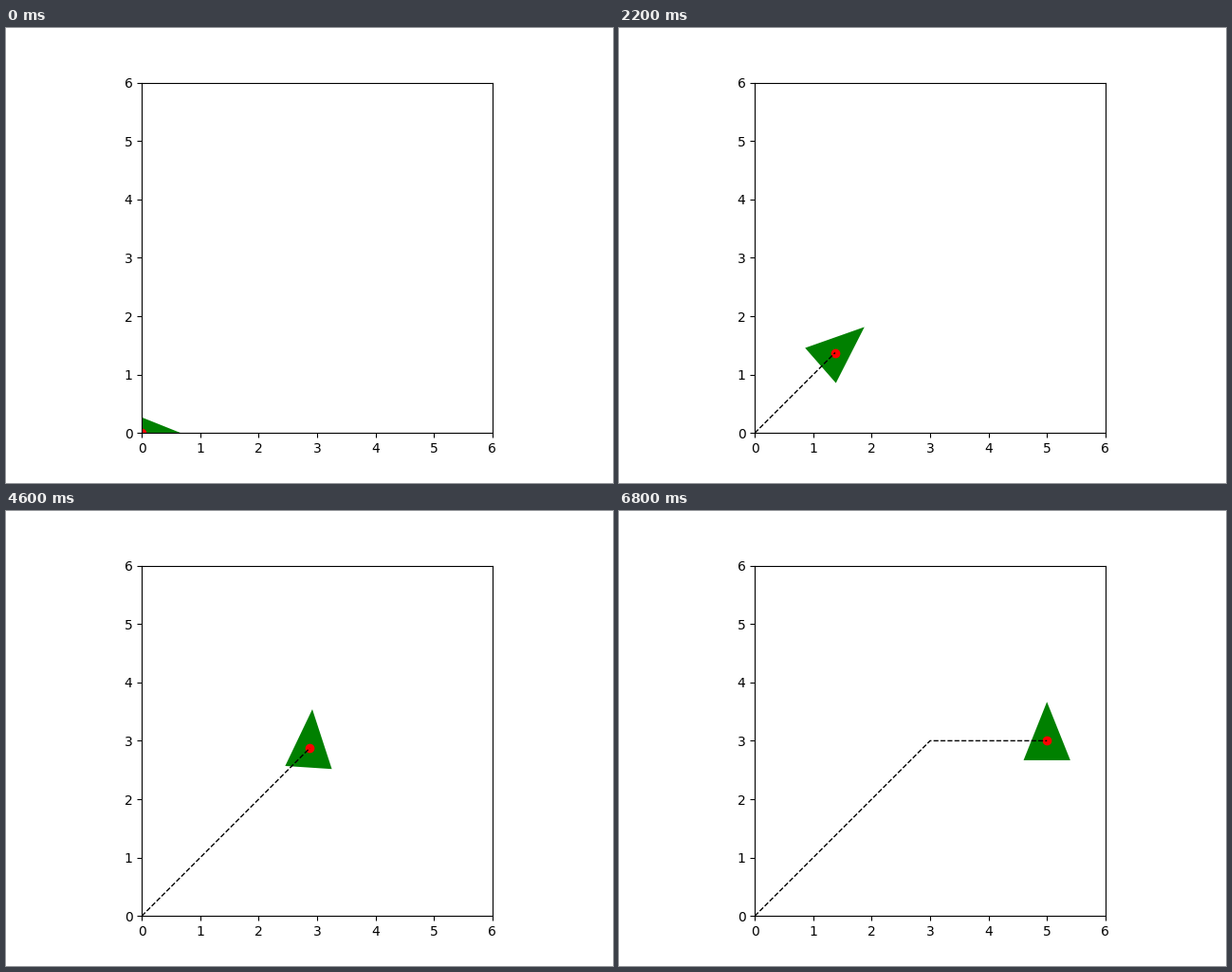
These frames come from a looping animation (640 px wide and 480 px high, 7 s). A matplotlib script:

```python
import numpy as np
import matplotlib.pyplot as plt
from matplotlib.animation import FuncAnimation
from matplotlib.patches import Polygon

TURN_STEPS, SLIDE_STEPS = 25, 10

# Diagonal run with a quarter turn, then a straight slide to the right.
xs = np.concatenate([np.linspace(0, 3, TURN_STEPS), np.linspace(3, 5, SLIDE_STEPS)])
ys = np.concatenate([np.linspace(0, 3, TURN_STEPS), np.full(SLIDE_STEPS, 3.0)])
angles = np.concatenate([np.linspace(0, np.pi / 2, TURN_STEPS),
                         np.full(SLIDE_STEPS, np.pi / 2)])

# Triangle around its centroid, pointing right.
SHAPE = np.array([[2 / 3, 0], [-1 / 3, 0.4], [-1 / 3, -0.4]])


def placed(i):
    c, s = np.cos(angles[i]), np.sin(angles[i])
    return SHAPE @ np.array([[c, s], [-s, c]]) + (xs[i], ys[i])


fig, ax = plt.subplots(figsize=(6.4, 4.8), dpi=100)
ax.set_xlim(0, 6)
ax.set_ylim(0, 6)
ax.set_aspect("equal")
ax.set_xticks(range(7))
ax.set_yticks(range(7))

triangle = ax.add_patch(Polygon(placed(0), closed=True, facecolor="green"))
dot, = ax.plot([], [], "ro")
trail, = ax.plot([], [], "k--", lw=1)


def update(i):
    triangle.set_xy(placed(i))
    dot.set_data([xs[i]], [ys[i]])
    trail.set_data(xs[:i + 1], ys[:i + 1])
    return triangle, dot, trail


anim = FuncAnimation(fig, update, frames=len(xs), interval=200,
                     init_func=lambda: update(0), repeat=True, repeat_delay=0)
plt.show()
```
